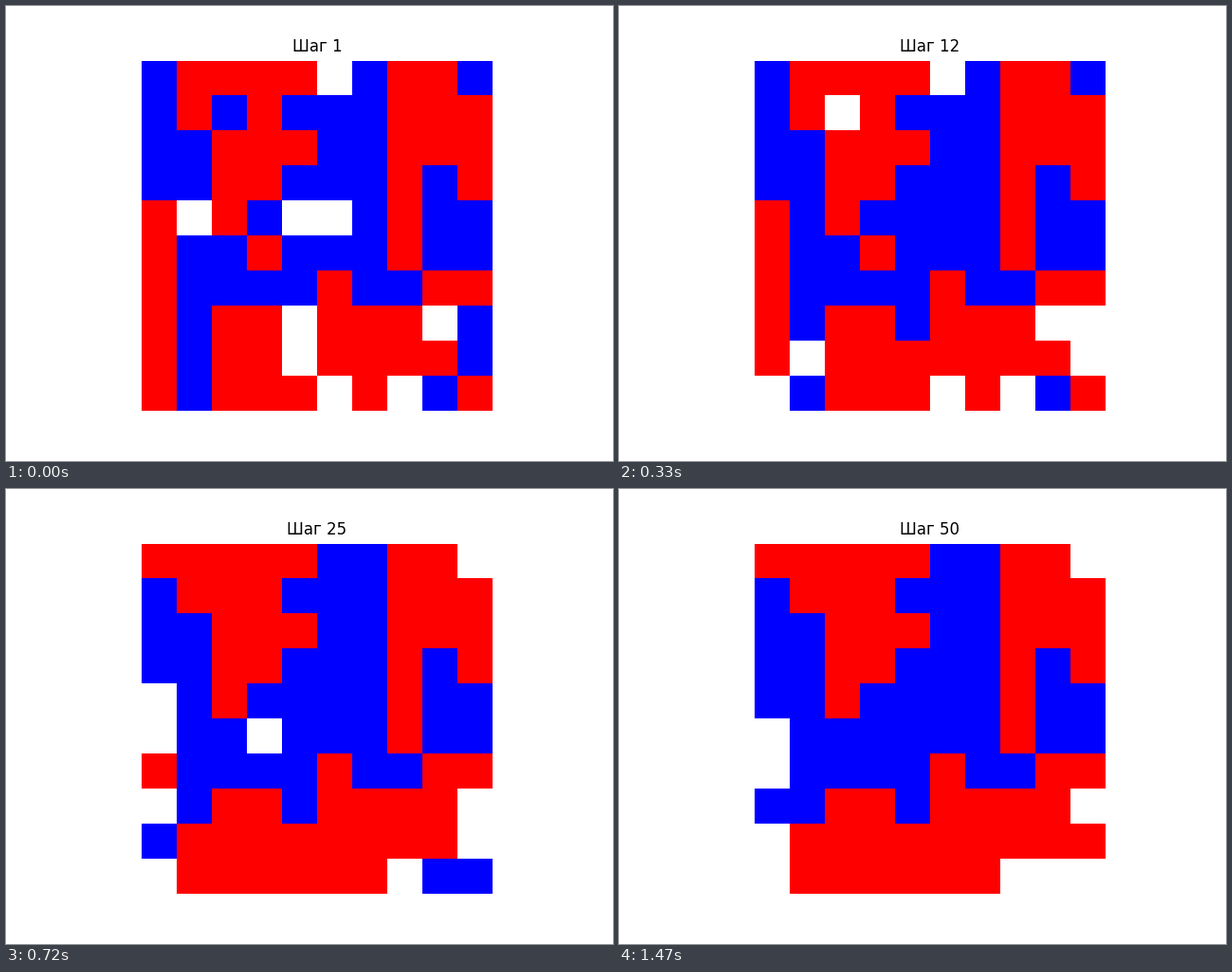
A matplotlib script that plays this animation: 640 by 480 pixels, repeating every 1500 ms.

```python
import random

import numpy as np
import matplotlib.pyplot as plt
from matplotlib.animation import FuncAnimation
from matplotlib.colors import ListedColormap

STEPS = 50
MOVING_STEPS = 36
INTERVAL = 30
KINDS = ".RB"
EMPTY, RED, BLUE = range(3)

START = """
BRRRR.BRRB
BRBRBBBRRR
BBRRRBBRRR
BBRRBBBRBR
R.RB..BRBB
RBBRBBBRBB
RBBBBRBBRR
RBRR.RRR.B
RBRR.RRRRB
RBRRR.R.BR
""".split()

# Unhappy agents in the order they leave, and homes in the order they fill.
# A cell is written as its row and column digits.
LEAVERS = "12 90 09 91 79 89 00 81 53 80 70 40 99 50 60 98".split()
HOMES = ("B44 B45 R84 B41 B74 R12 R78 R81 "
         "B05 R00 R91 R95 R89 B40 B53 B70").split()


def eased_count(total, t, power):
    return int(total * (1 - (1 - t) ** power))


def is_lonely(board, cell):
    """A blue agent here would have fewer than two blue neighbours."""
    r, c = divmod(cell, 10)
    block = board[max(r - 1, 0):r + 2, max(c - 1, 0):c + 2]
    return np.count_nonzero(block == BLUE) < 2


def build_boards():
    rng = random.Random(4)
    start = np.array([[KINDS.index(c) for c in row] for row in START])
    boards = [start]
    drifters = []
    for step in range(1, MOVING_STEPS + 1):
        t = step / MOVING_STEPS
        gone = eased_count(len(LEAVERS), t, 2)
        settled = eased_count(len(HOMES), t, 1.27)

        board = start.copy()
        for cell in LEAVERS[:gone]:
            board.flat[int(cell)] = EMPTY
        for home in HOMES[:settled]:
            board.flat[int(home[1:])] = KINDS.index(home[0])

        # Agents without a home drift: the one that sat longest hops on
        free = [d for d in drifters[1:] if board.flat[d] == EMPTY]
        drifters = free[:gone - settled]
        board.flat[drifters] = BLUE
        while len(drifters) < gone - settled:
            spots = [int(i) for i in np.flatnonzero(board == EMPTY)
                     if is_lonely(board, int(i))]
            drifters.append(rng.choice(spots))
            board.flat[drifters[-1]] = BLUE
        boards.append(board)
    return boards


boards = build_boards()

fig, ax = plt.subplots(figsize=(6.4, 4.8), dpi=100)
ax.axis("off")
image = ax.imshow(boards[0], cmap=ListedColormap(["white", "red", "blue"]),
                  vmin=0, vmax=2, interpolation="nearest")
title = ax.set_title("Шаг 1", fontname="DejaVu Sans", fontsize=12, pad=6.72)


def update(i):
    image.set_data(boards[min(i, MOVING_STEPS)])
    title.set_text(f"Шаг {i + 1}")
    return image, title


anim = FuncAnimation(fig, update, frames=STEPS, interval=INTERVAL, repeat=True)
plt.show()
```
